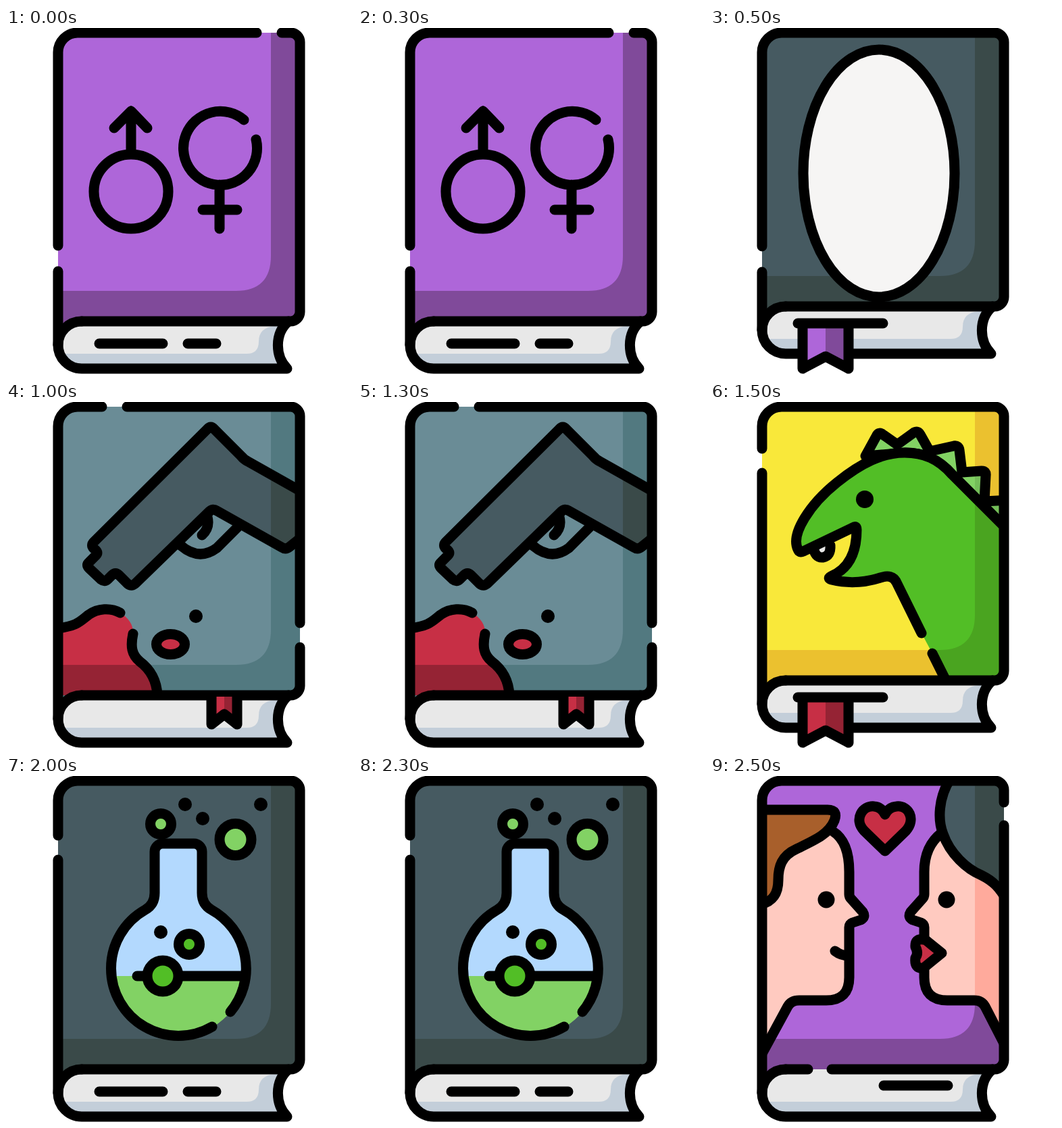
Animation, 512 px wide and 512 px high, one loop 3000 ms. Source, as an HTML page:

```html
<!DOCTYPE html>
<html lang="en">
<head>
<meta charset="utf-8">
<title>Book covers</title>
<style>
  html, body { margin: 0; height: 100%; overflow: hidden; background: #fff; }
  svg { display: block; width: 100%; height: 100%; }
  .line { fill: none; stroke: #000; stroke-width: 15; stroke-linecap: round; stroke-linejoin: round; }
</style>
</head>
<body>
<svg id="stage" viewBox="0 0 512 512"></svg>
<script>
const TALL = 434, SHORT = 412;
const PURPLE = ['#ae66d9', '#804a9a'], SLATE = ['#465a61', '#3a4a49'], TEAL = ['#6a8c96', '#527980'],
  YELLOW = ['#f9e83a', '#ebc12f'], RED = ['#c72f45', '#952334'], GREEN = ['#52be26', '#4aa420'],
  LIME = ['#82d264', '#74bd59'], SKIN = ['#ffcac0', '#ffaa9c'], BROWN = ['#a85f2b', '#a85f2b'];

const line = d => `<path class="line" d="${d}"/>`;
const fill = (d, color) => `<path d="${d}" fill="${color}"/>`;
const dot = (x, y, r) => `<circle cx="${x}" cy="${y}" r="${r}"/>`;
const oval = (x, y, rx, ry, color) =>
  `<ellipse class="line" cx="${x}" cy="${y}" rx="${rx}" ry="${ry}" style="fill:${color}"/>`;
const bubble = (x, y, r, color) => oval(x, y, r, r, color);

// Fill that turns darker where it crosses the cover's shaded edge
const shaded = (d, [light, dark], y = TALL) =>
  fill(d, light) + `<g clip-path="url(#shade${y})">${fill(d, dark)}</g>`;
const shape = (d, colors, y, outline = d) => shaded(d, colors, y) + line(outline);

// Outlined shape whose stroke skips the curve between start and rest
const gapped = (start, curve, end, rest, colors, y, close) =>
  shape(`${start}${curve} ${end}${rest}${close}`, colors, y, `${start}M${end}${rest}`);

function ribbon(left, right, top, bottom, notch, [light, dark]) {
  const mid = (left + right) / 2;
  return fill(`M${left} ${top}V${bottom}L${mid} ${notch}V${top}Z`, light) +
    fill(`M${right} ${top}V${bottom}L${mid} ${notch}V${top}Z`, dark) +
    line(`M${left} ${top}V${bottom}L${mid} ${notch}L${right} ${bottom}V${top}`);
}

function book({ y = TALL, colors, gaps, art, extras }) {
  const h = 70, r = h / 2;
  const { left = '', top = '', right = '', bottom = '' } = gaps;
  const cover = `M77 ${y + r}V36a29 29 0 0 1 29-29H421a14 14 0 0 1 14 14V${y - 14}a14 14 0 0 1-14 14H112Z`;
  const edge = `M112 ${y}a${r} ${r} 0 0 0 0 ${h}H416C398 ${y + h - 18} 397 ${y + 18} 418 ${y}`;
  const paper = `M112 ${y}H398v7Q374 ${y + 9} 374 ${y + 30}Q374 ${y + 48} 356 ${y + 48}H84` +
    `Q77 ${y + 43} 77 ${y + r}a${r} ${r} 0 0 1 35-${r}Z`;
  return `<g>${shaded(cover, colors, y)}
    <g clip-path="url(#cover${y})">${art}</g>
    ${fill(edge + 'Z', '#c3ced9')}${fill(paper, '#e8e8e8')}${line(edge)}
    ${line(`M77 ${y + r}${left}V36a29 29 0 0 1 29-29${top}H421a14 14 0 0 1 14 14${right}V${y - 14}a14 14 0 0 1-14 14${bottom}H112`)}
    ${extras}</g>`;
}

const spineBars = line('M138 467H232M269 467H311');
const bookmark = colors => ribbon(137, 205, 438, 504, 486, colors) + line('M130 437H256');

const symbols = book({
  colors: PURPLE,
  gaps: { left: 'V360M77 322', top: 'H371M408 7' },
  art: line('M130 242a55 55 0 1 0 110 0a55 55 0 1 0-110 0M185 187V123M160 148L185 123L209 148') +
    line('M352 136A54.5 54.5 0 1 0 370 165M316 232V297M291 269H342'),
  extras: spineBars
});

const spooky = book({
  y: SHORT,
  colors: SLATE,
  gaps: { left: 'V361M77 323' },
  art: oval(250, 215, 112, 183, '#f6f5f4'),
  extras: bookmark(PURPLE)
});

const crime = book({
  colors: TEAL,
  gaps: { top: 'H142M179 7', right: 'V327M435 363' },
  art: line('M257 211Q285 236 312 216L345 183M298 170Q302 186 290 197') +
    shape('M445 137L358 88Q352 85 348 80L308 40Q303 34 298 40L130 207Q125 212 130 217Q138 222 133 227' +
      'L123 237Q118 241 123 246L141 263Q146 267 151 262L157 256Q162 251 167 256L180 269Q186 274 192 268' +
      'L301 162Q306 157 312 161L408 215Q414 219 420 214L445 194', SLATE) +
    gapped('M77 335C105 331 108 326 122 315C136 305 155 304 169 312', 'C181 319 189 330', '188 343',
      'C184 362 186 374 198 384C214 396 223 412 224 434', RED, TALL, 'H77Z') +
    dot(281, 317, 10) + oval(243.5, 358.5, 21, 15, RED[0]),
  extras: ribbon(304, 342, 436, 477, 462, RED)
});

const dinosaur = book({
  y: SHORT,
  colors: YELLOW,
  gaps: { left: 'V105M77 69' },
  art: shape('M230 80L247 49Q251 43 257 49L277 63L302 45Q308 42 311 48L325 73L361 65Q368 64 369 71L373 104' +
      'L402 102Q409 102 408 109L406 147L445 145V194L358 107Q330 75 290 75Z', LIME, SHORT) +
    `<path class="line" style="fill:#e8e8e8" d="M153 214Q155 231 167 230Q179 228 178 212"/>` +
    gapped('M445 194L358 107C338 84 316 75 288 75C255 75 224 90 188 119C148 151 119 195 130 218Q132 224 138 221' +
      'L211 186Q217 182 217 189C217 224 205 247 179 258Q173 261 180 263C205 269 230 267 252 260' +
      'Q270 254 276 267L313 342', 'L', '329 372', 'L353 420', GREEN, SHORT, 'H445Z') +
    dot(229, 144, 13),
  extras: bookmark(RED)
});

const glass = 'M305 371A99.5 99.5 0 0 1 155.5 284.5A99.5 99.5 0 0 1 206 198C215 193 220 184 220 173V112' +
  'a12 12 0 0 1 12-12H278a12 12 0 0 1 12 12V173C290 184 295 193 304 198A99.5 99.5 0 0 1 332 349';

const chemistry = book({
  colors: SLATE,
  gaps: { left: 'V124M77 88' },
  art: fill(glass + 'A99.5 99.5 0 0 1 305 371', '#b3d9fe') +
    fill('M156 296H354A99.5 99.5 0 0 1 156 296Z', LIME[0]) +
    line(glass + 'M194 296H353') +
    bubble(232, 296, 23, GREEN[0]) + bubble(271, 249, 15.5, GREEN[0]) +
    bubble(229, 71, 15.5, LIME[0]) + bubble(339.5, 94, 23.5, LIME[0]) +
    dot(229, 231, 10) + dot(265, 42, 10) + dot(291, 63, 10) + dot(377, 42, 10),
  extras: spineBars
});

const leftNose = 'C198 92 206 112 206 142V175Q206 179 209 182L226 201Q231 209 223 213' +
  'L211 217Q206 219 206 224V298Q206 332 172 332H132Q120 332 115 341L72 420';
const rightFace = 'M343 84C326 97 317 115 317 142V175Q317 179 314 182L297 201Q292 209 300 213' +
  'L312 217Q317 219 317 224V298Q317 332 351 332H391Q402 332 407 341L445 415';

const romance = book({
  colors: PURPLE,
  gaps: { right: 'V39M435 73', bottom: `H180M145 ${TALL}` },
  art: shape(`M72 50H174L182 82${leftNose}Z`, SKIN, TALL, `M182 82${leftNose}M185 259Q194 266 206 266`) +
    shape('M70 50H174Q190 50 184 66C176 86 155 95 128 108C106 118 101 134 101 154C101 172 95 187 70 191', BROWN) +
    shape(rightFace + 'V84Z', SKIN, TALL, rightFace) +
    shape('M357 2C337 32 337 66 345 86C355 115 380 138 402 147C420 156 428 165 440 185H460V2Z', SLATE) +
    shape('M315 242Q303 240 304 253Q309 262 304 269Q302 286 316 284L343 262L322 245Q319 242 315 242Z', RED) +
    shape('M259 111L228 81C212 64 226 43 243 45Q254 46 259 57Q264 46 276 45C294 43 305 64 290 81Z', RED) +
    dot(172, 183, 12.5) + dot(350, 183, 12.5),
  extras: line('M257 458H352')
});

const clips = [TALL, SHORT].map(y => `
  <clipPath id="cover${y}"><path d="M77 7H435V${y}H77Z"/></clipPath>
  <clipPath id="shade${y}"><path d="M392 0H445V480H77V${y - 45}H340Q392 ${y - 45} 392 ${y - 97}Z"/></clipPath>`);

const stage = document.getElementById('stage');
stage.innerHTML = `<defs>${clips.join('')}</defs>` +
  [symbols, spooky, crime, dinosaur, chemistry, romance].join('');
const books = [...stage.children].slice(1);

function draw() {
  const current = Math.floor(performance.now() % 3000 / 500);
  books.forEach((el, i) => el.style.display = i === current ? '' : 'none');
  requestAnimationFrame(draw);
}
draw();
</script>
</body>
</html>
```
